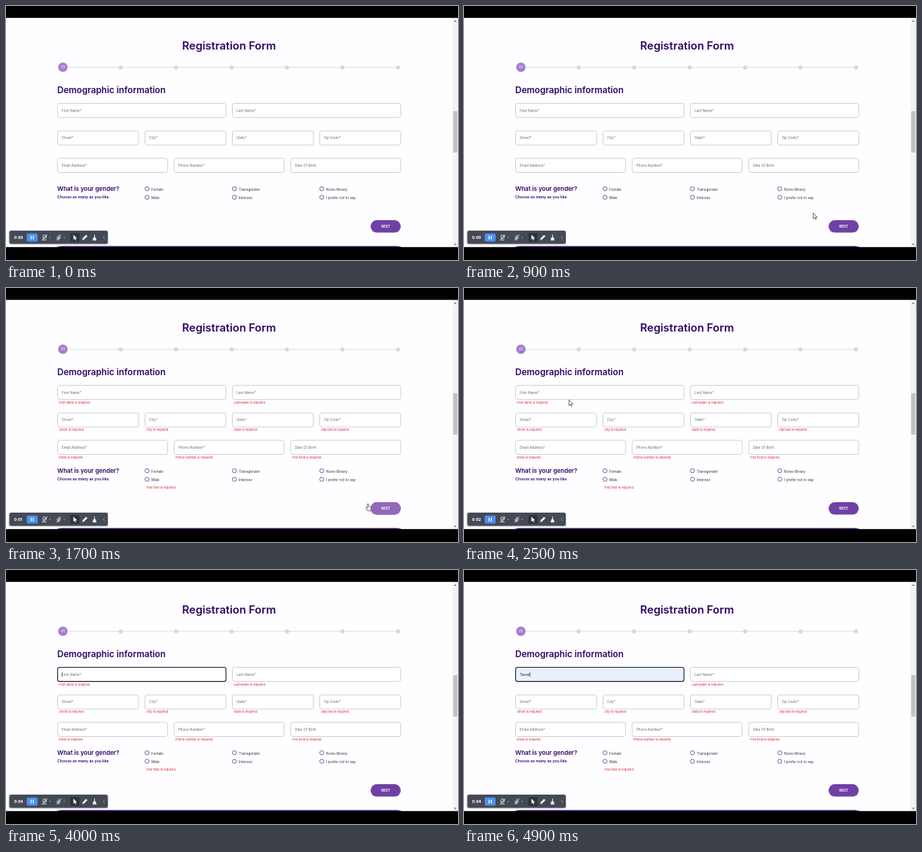
An HTML page for the animation above (5000 ms loop, 600 px wide and 338 px high).

```html
<!DOCTYPE html>
<html lang="en">
<head>
<meta charset="utf-8">
<title>Registration Form</title>
<style>
  html, body { margin: 0; width: 100%; height: 100%; overflow: hidden; background: #000; }
  svg { display: block; width: 100vw; height: 100vh; font-family: Inter, sans-serif; }
  .heading { font-weight: 600; fill: #2f0563; }
  .hint { font-weight: 600; fill: #3a0a70; }
  .label { font-size: 4.65px; fill: #6d6a72; }
  .option { font-size: 4.7px; fill: #37323f; }
  .error { font-size: 4.05px; fill: #dc1f33; }
  .field { fill: #fff; stroke: #c6c5cb; stroke-width: .8; }
  .radio { fill: #fff; stroke: #5b3a88; stroke-width: .8; }
  .white { fill: #fff; }
  .pointer { fill: #fff; stroke: #333; stroke-width: .7; stroke-linejoin: round; }
  .icon { fill: none; stroke: #eef0f3; stroke-width: .9; stroke-linecap: round; stroke-linejoin: round; }
</style>
</head>
<body>
<svg id="stage" viewBox="0 0 600 338" preserveAspectRatio="none">
  <rect width="600" height="338"/>
  <rect y="15.800" width="593" height="305" fill="#fefdff"/>
  <rect x="593" y="15.800" width="7" height="305" fill="#f3f2f4"/>
  <rect x="593.6" y="140" width="5.6" height="55" fill="#c2c1c4"/>
  <path d="M594.8 21l1.6-2 1.6 2zM594.8 316.500l1.6 2 1.6-2z" fill="#666"/>
  <path d="M67.500 321q2-1.500 6-1.500H519q4 0 6 1.500z" fill="#2f0563"/>

  <g id="form"></g>
  <g id="errors"></g>

  <g id="button">
    <rect x="484" y="285" width="40" height="16.600" rx="8.300" fill="#6f41a5"/>
    <rect id="hover" x="484" y="285" width="40" height="16.600" rx="8.300" fill="#9269b9"/>
    <text class="white" x="504" y="294.900" font-size="4.2" font-weight="700" text-anchor="middle">NEXT</text>
  </g>

  <g id="toolbar">
    <rect x="3.500" y="298.500" width="132.500" height="19" rx="2.500" fill="#000" opacity=".2"/>
    <rect x="4.500" y="299" width="130.500" height="17.600" rx="2.500" fill="#444a55"/>
    <text id="clock" class="white" x="10.800" y="309.700" font-size="4.900" font-weight="800"></text>
    <rect x="27.500" y="302.700" width="14.500" height="10.800" rx="1.800" fill="#4d8ff0"/>
    <path d="M33.300 305.700v4.800M36.200 305.700v4.800" stroke="#fff" stroke-width="1.300"/>
    <rect x="85.500" y="302" width="12" height="12" rx="1.500" fill="#2d323b"/>
    <g class="icon">
      <circle cx="51.200" cy="307" r="2.300"/>
      <path d="M49 311.300h4.400M48 311.500l6.500-7"/>
      <path d="M70 305v2.500M67.800 307.500q0 2.300 2.200 2.300t2.200-2.300M70 310v1.700M67 311.500l6-7"/>
      <path d="M101.800 310.800l.5-1.900 4-4 1.400 1.400-4 4z" fill="#eef0f3"/>
      <path d="M117.500 304.500v3M115.500 311.300l.9-3.400h2.200l.9 3.400z" fill="#eef0f3"/>
      <path d="M130.700 306l-1.500 2 1.500 2" stroke="#a4a8b0" stroke-width=".7"/>
    </g>
    <path d="M57.600 307.700h2l-1 1.200zM76.300 307.700h2l-1 1.200z" fill="#cfd2d7"/>
    <path class="white" d="M89.500 304.300v6.800l1.600-1.500 1.100 2.400 1-.5-1.100-2.300h2.200z"/>
  </g>

  <g id="cursor">
    <path id="arrow" class="pointer" d="M0 0v7.500l1.700-1.500 1.200 2.700 1.200-.5-1.200-2.600h2.300z"/>
    <path id="hand" class="pointer" d="M-.8 .7q.8-1.200 1.600 0v3l2.800 .6q1 .3 .8 1.500l-.6 3.600h-4.200l-2.400-3.300q0-1.300 1.200-.8l.8.700z"/>
    <path id="beam" d="M-1.300 0q1.300 0 1.300 .8 0-.8 1.300-.8M0 .8v6.400M-1.300 8q1.300 0 1.300-.8 0 .8 1.300 .8" fill="none" stroke="#333" stroke-width=".6"/>
  </g>
</svg>
<script>
const LOOP = 5000, STEP = 100;
const NAME = "Tavrel";
const FOCUS = 4000, FIRST_KEY = 4200, FILLED = 4400, ERRORS = 1500;
const SECONDS = [1000, 2000, 3100, 4000];
const $ = id => document.getElementById(id);
const form = $("form"), errors = $("errors");

function add(parent, tag, attrs, text = "") {
  const node = document.createElementNS("http://www.w3.org/2000/svg", tag);
  for (const key in attrs) node.setAttribute(key, attrs[key]);
  node.textContent = text;
  return parent.appendChild(node);
}
const write = (parent, cls, x, y, text, more = {}) =>
  add(parent, "text", { class: cls, x, y, ...more }, text);

// Heading and progress line
write(form, "heading", 296, 58.4, "Registration Form", { "font-size": 14.6, "text-anchor": "middle" });
add(form, "path", { d: "M80 81.700H520", stroke: "#dedde0" });
for (let i = 0; i < 6; i++)
  add(form, "circle", { cx: 152.3 + i * 73.6, cy: 81.7, r: 2.7, fill: "#d8d7da" });
add(form, "circle", { cx: 75.5, cy: 81.5, r: 6.2, fill: "#a57ccb" });
write(form, "white", 75.5, 83.3, "01", { "font-size": 5, "text-anchor": "middle" });
write(form, "heading", 68, 115.5, "Demographic information", { "font-size": 11.7 });

// Rows of fields: [label, error]
const rows = [
  { y: 129.5, width: 223.5, pitch: 232, fields: [
    ["First Name*", "First name is required"], ["Last Name*", "Last Name is required"]] },
  { y: 166.2, width: 107.5, pitch: 116, fields: [
    ["Street*", "Street is required"], ["City*", "City is required"],
    ["State*", "State is required"], ["Zip Code*", "Zipcode is required"]] },
  { y: 202.7, width: 146, pitch: 154.7, fields: [
    ["Email Address*", "Email is required"], ["Phone Number*", "Phone number is required"],
    ["Date Of Birth", "This field is required."]] },
];
const inputs = rows.flatMap(({ y, width, pitch, fields }) =>
  fields.map(([label, error], i) => {
    const x = 68.5 + i * pitch;
    return {
      box: add(form, "rect", { class: "field", x, y, width, height: 18.8, rx: 2.8 }),
      text: write(form, "label", x + 5.5, y + 11.2, label),
      error: write(errors, "error", x + 1.7, y + 24.1, error),
    };
  }));
const first = inputs[0];
const caret = add(form, "rect", { y: 136.2, width: .6, height: 6, fill: "#3a2226" });

// Choices
write(form, "heading", 68, 246.4, "What is your gender?", { "font-size": 8 });
write(form, "hint", 68, 256.2, "Choose as many as you like", { "font-size": 5.15 });
[["Female", "Male"], ["Transgender", "Intersex"], ["None-Binary", "I prefer not to say"]]
  .forEach((pair, col) => pair.forEach((name, row) => {
    const x = 187.2 + col * 116, y = 243.2 + row * 11.4;
    add(form, "circle", { class: "radio", cx: x, cy: y, r: 2.7 });
    write(form, "option", x + 5.9, y + 2.4, name);
  }));
write(errors, "error", 186, 267.4, "This field is required.");

// Time tables: [time, value...]
const path = [
  [100, 300, 150], [600, 409, 252], [1100, 500, 291], [1500, 500, 291], [1700, 480.5, 287],
  [1800, 440, 266], [2100, 300, 218], [2400, 300, 218], [2500, 139.3, 148.8], [2800, 139.3, 135],
];
const hover = [[1000, 0], [1200, 1], [1800, 1], [2100, 0]];
const shapes = [[100, "arrow"], [1100, "hand"], [1800, "arrow"], [2600, "beam"], [FOCUS, ""]];

function between(table, t) {
  const next = table.findIndex(row => row[0] > t);
  if (next < 1) return table.at(next).slice(1);
  const a = table[next - 1], b = table[next];
  const part = (t - a[0]) / (b[0] - a[0]);
  return a.slice(1).map((v, i) => v + (b[i + 1] - v) * part);
}
const show = (node, on) => node.setAttribute("visibility", on ? "visible" : "hidden");

function draw(t) {
  $("clock").textContent = "0:0" + SECONDS.filter(s => t >= s).length;
  $("hover").setAttribute("opacity", between(hover, t)[0]);

  const shape = shapes.findLast(row => t >= row[0])?.[1];
  for (const id of ["arrow", "hand", "beam"]) show($(id), id === shape);
  $("cursor").setAttribute("transform", `translate(${between(path, t)})`);

  const focused = t >= FOCUS, typed = t >= FIRST_KEY, filled = t >= FILLED;
  show(errors, t >= ERRORS);
  first.error.style.display = typed ? "none" : "";
  first.text.textContent = filled ? NAME : typed ? NAME[0] : "First Name*";
  first.text.style.fill = typed ? "#222" : "";
  first.box.style.stroke = focused ? "#26242c" : "";
  first.box.style.strokeWidth = focused ? 1.15 : "";
  first.box.style.fill = filled ? "#e8f0fe" : "";
  caret.setAttribute("x", 74.2 + (typed ? first.text.getComputedTextLength() : 0));
  show(caret, focused);
}

function tick() {
  const steps = Math.floor((performance.now() + 8) / STEP);
  draw(steps * STEP % LOOP);
  requestAnimationFrame(tick);
}
tick();
</script>
</body>
</html>
```
